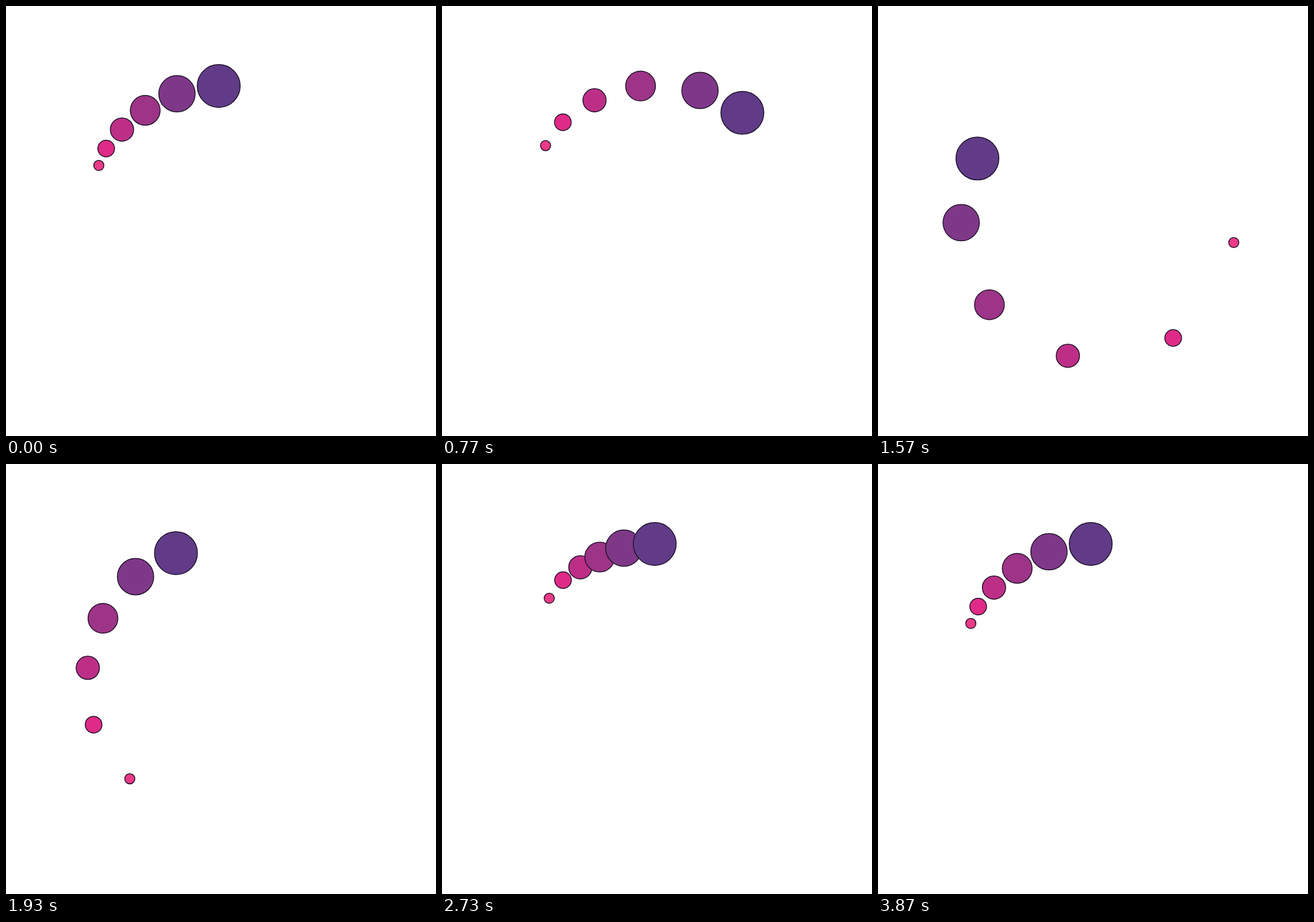
Animation of 748x748 px, one loop 3930 ms. Source, as an HTML page with a canvas:

```html
<!DOCTYPE html>
<html>
<head>
<meta charset="utf-8">
<style>
html, body { margin: 0; height: 100%; overflow: hidden; background: #fff; }
canvas { display: block; }
</style>
</head>
<body>
<canvas id="stage" width="748" height="748"></canvas>
<script>
const ctx = document.getElementById('stage').getContext('2d');
const LOOP = 3930, FRAME = 100 / 3, LAST = 116;
const CX = 381.5, CY = 374, LINE = 1.5;

// Angles in degrees clockwise from the top, times in frames.
// Each dot swings from `from` to `peak`, then settles back to 360 between `back` and `end`.
const dots = [
  { color: '#eb3a87', size: 9.6, orbit: 240.3, rest: -66.3, start: 10.1, len: 86.9, from: 0, peak: 380, back: 95, end: 111 },
  { color: '#e02a87', size: 15.3, orbit: 242.5, rest: -58.7, start: 8.1, len: 84.8, from: 0, peak: 378, back: 89.3, end: 112 },
  { color: '#bd2f87', size: 21, orbit: 240, rest: -48.5, start: 6.1, len: 82.8, from: 0, peak: 374.2, back: 85.2, end: 113 },
  { color: '#9d3487', size: 26.7, orbit: 237.6, rest: -35.9, start: 4.07, len: 80.9, from: 0, peak: 369.4, back: 83.2, end: 115 },
  { color: '#7f3888', size: 32.4, orbit: 236.8, rest: -20.8, start: 2.2, len: 78.4, from: 0, peak: 364.8, back: 82.5, end: 116 },
  { color: '#613b87', size: 38.1, orbit: 235.2, rest: -2.8, start: 0.47, len: 77, from: -10, peak: 360, back: 80, end: 116 }
];

const clamp = v => Math.max(0, Math.min(1, v));
const smooth = s => s * s * (3 - 2 * s);

// cubic-bezier(.615, 0, .2375, 1)
function ease(x) {
  let lo = 0, hi = 1;
  for (let i = 0; i < 30; i++) {
    const s = (lo + hi) / 2, q = 1 - s;
    if (3 * s * q * q * 0.615 + 3 * s * s * q * 0.2375 + s ** 3 < x) lo = s;
    else hi = s;
  }
  return smooth(lo);
}

function turn(d, f) {
  const swing = d.from + (d.peak - d.from) * ease(clamp((f - d.start) / d.len));
  return swing - (d.peak - 360) * smooth(clamp((f - d.back) / (d.end - d.back)));
}

function draw(now) {
  const t = now % LOOP;
  // The loop opens on its closing pose.
  const f = Math.min(LAST, Math.floor((t + 5) / FRAME)) || LAST;
  ctx.fillStyle = '#fff';
  ctx.fillRect(0, 0, 748, 748);
  ctx.lineWidth = LINE;
  ctx.strokeStyle = '#1c1026';
  for (const d of dots) {
    const a = (d.rest + turn(d, f)) * Math.PI / 180;
    ctx.beginPath();
    ctx.arc(CX + d.orbit * Math.sin(a), CY - d.orbit * Math.cos(a), d.size - LINE / 2, 0, 2 * Math.PI);
    ctx.fillStyle = d.color;
    ctx.fill();
    ctx.stroke();
  }
}

const begin = performance.now();
function tick() {
  draw(performance.now() - begin);
  requestAnimationFrame(tick);
}
tick();
</script>
</body>
</html>
```
